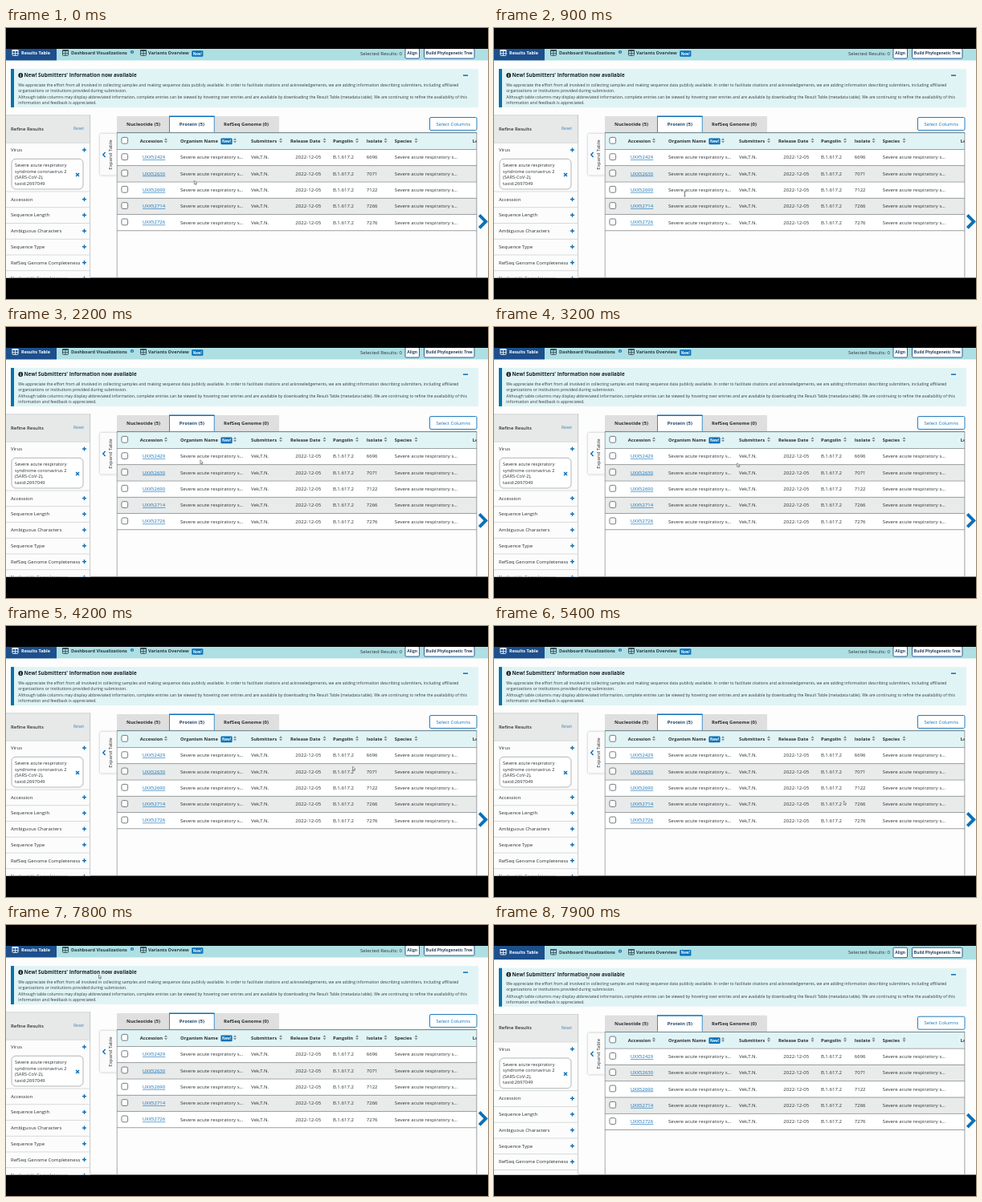
These frames come from a looping animation (600 by 338 pixels, 8000 ms). An HTML page with a canvas:

```html
<!DOCTYPE html>
<html lang="en">
<head>
<meta charset="utf-8">
<title>Results table</title>
<style>
html, body { margin: 0; width: 100%; height: 100%; overflow: hidden; background: #000; }
canvas { display: block; width: 600px; height: 338px; }
</style>
</head>
<body>
<canvas id="stage" width="600" height="338"></canvas>
<script>
const ctx = document.getElementById('stage').getContext('2d');
const LOOP = 8000, STEP = 100;
const BLUE = '#0b6fb8', NAVY = '#1c4f8c', INK = '#2b2f33', LINE = '#cfd2d3', RULE = '#84898c';
const FAMILY = '"Open Sans", "Noto Sans", sans-serif';

function rect(x, y, w, h, color) {
  ctx.fillStyle = color;
  ctx.fillRect(x, y, w, h);
}

function box(x, y, w, h, r, fill, stroke, lw = 1) {
  ctx.beginPath();
  ctx.roundRect(x, y, w, h, r);
  if (fill) { ctx.fillStyle = fill; ctx.fill(); }
  if (stroke) { ctx.strokeStyle = stroke; ctx.lineWidth = lw; ctx.stroke(); }
}

function path(points, color, lw) {
  ctx.beginPath();
  points.forEach(([x, y], i) => i ? ctx.lineTo(x, y) : ctx.moveTo(x, y));
  ctx.strokeStyle = color;
  ctx.lineWidth = lw;
  ctx.stroke();
}

// y is the middle of the capitals; type is set large and scaled down for even spacing
function text(str, x, y, size, color = INK, weight = 400, align = 'left') {
  ctx.save();
  ctx.translate(x, y + size * 0.35);
  ctx.scale(0.1, 0.1);
  ctx.font = `${weight} ${size * 10}px ${FAMILY}`;
  ctx.textAlign = align;
  ctx.fillStyle = color;
  ctx.fillText(str, 0, 0);
  ctx.restore();
}

const bold = (str, x, y, size, color, align) => text(str, x, y, size, color, 700, align);

function gridIcon(x, y, color) {
  box(x + 0.5, y + 0.5, 7, 6.5, 0.8, null, color, 0.9);
  rect(x, y, 8, 1.6, color);
  rect(x + 3.6, y, 0.8, 7, color);
  rect(x, y + 4, 8, 0.8, color);
}

function badge(x, y) {
  box(x, y, 14.2, 7.6, 1.2, '#0872b9');
  bold('New!', x + 7.1, y + 3.8, 4.4, '#fff', 'center');
}

function info(x, y, r, color) {
  ctx.beginPath();
  ctx.arc(x, y, r, 0, Math.PI * 2);
  ctx.fillStyle = color;
  ctx.fill();
  rect(x - r * 0.17, y - r * 0.1, r * 0.4, r * 0.7, '#fff');
  rect(x - r * 0.17, y - r * 0.6, r * 0.4, r * 0.35, '#fff');
}

function plus(x, y) {
  rect(x - 2.5, y - 0.7, 5, 1.4, BLUE);
  rect(x - 0.7, y - 2.5, 1.4, 5, BLUE);
}

function sortMark(x, y) {
  ctx.fillStyle = '#7d878c';
  for (const d of [-1, 1]) {
    ctx.beginPath();
    ctx.moveTo(x - 2, y + d * 0.6);
    ctx.lineTo(x + 2, y + d * 0.6);
    ctx.lineTo(x, y + d * 3);
    ctx.fill();
  }
}

function nav() {
  rect(0, 15, 600, 25.4, '#aedfe2');
  rect(0, 15, 63, 25.4, NAVY);
  gridIcon(7.5, 27.3, '#fff');
  bold('Results Table', 19, 31.5, 5.5, '#fff');
  gridIcon(70, 27.3, '#2d4450');
  bold('Dashboard Visualizations', 81, 31.5, 5.54, '#263840');
  info(157, 30, 2.1, BLUE);
  gridIcon(167, 27.3, '#2d4450');
  bold('Variants Overview', 177, 31.5, 5.54, '#263840');
  badge(231.2, 28.2);
  text('Selected Results: 0', 441, 31.5, 6.02);
  box(497, 25.5, 17.5, 12.5, 1.5, '#fff', NAVY, 0.9);
  bold('Align', 505.7, 31.3, 5.05, '#24405c', 'center');
  box(520.5, 25.5, 62.5, 12.5, 1.5, '#fff', NAVY, 0.9);
  bold('Build Phylogenetic Tree', 551.8, 31.3, 4.97, '#24405c', 'center');
}

function notice() {
  rect(6, 51, 582, 48, '#e1f4f5');
  rect(6, 51, 4, 48, '#0a72a8');
  info(18.2, 59, 2.9, '#1b1e20');
  bold("New! Submitters' Information now available", 22.4, 59, 6.36, '#1e2224');
  rect(569, 58.4, 6, 1.5, BLUE);
  [
    'We appreciate the effort from all involved in collecting samples and making sequence data publicly available. In order to facilitate citations and acknowledgements, we are adding information describing submitters, including affiliated',
    'organizations or institutions provided during submission.',
    'Although table columns may display abbreviated information, complete entries can be viewed by hovering over entries and are available by downloading the Result Table (metadata table). We are continuing to refine the availability of this',
    'information and feedback is appreciated.'
  ].forEach((s, i) => text(s, 15.3, [70.8, 77.9, 86.3, 93.3][i], 5.09, '#33383b'));
}

function sidebar() {
  rect(0, 108.5, 105, 220, '#fbfcfb');
  rect(0, 108.5, 105, 34.5, '#e6e9e8');
  rect(0, 108.5, 105, 0.8, LINE);
  rect(104.2, 108.5, 0.9, 220, '#bfc3c4');
  text('Refine Results', 6, 125.5, 5.98, INK, 600);
  text('Reset', 84, 125.5, 5.05, '#3a7fb4');
  rect(0, 142.8, 105, 0.8, LINE);
  text('Virus', 6, 152, 6);
  plus(97.5, 152);
  box(7, 163.3, 89, 37.7, 5, '#fff', '#a9aeb0', 0.9);
  ['Severe acute respiratory', 'syndrome coronavirus 2', '(SARS-CoV-2),', 'taxid:2697049']
    .forEach((s, i) => text(s, 11, 171.2 + i * 7.45, 5.72));
  path([[87, 181], [91, 185]], BLUE, 1.4);
  path([[91, 181], [87, 185]], BLUE, 1.4);
  ['Accession', 'Sequence Length', 'Ambiguous Characters', 'Sequence Type',
    'RefSeq Genome Completeness', 'Nucleotide Completeness'].forEach((s, i) => {
    const y = 213.6 + i * 19.75;
    rect(0, y - 10, 105, 0.8, LINE);
    text(s, 6, y, 6);
    plus(97.5, y);
  });
}

function expander() {
  ctx.save();
  ctx.shadowColor = 'rgba(0,0,0,.3)';
  ctx.shadowBlur = 3;
  box(117, 132, 21, 51.5, 1.5, '#fbfbfb');
  ctx.restore();
  path([[123.6, 155], [120.8, 158], [123.6, 161]], BLUE, 1.4);
  ctx.save();
  ctx.translate(129.8, 158);
  ctx.rotate(-Math.PI / 2);
  text('Expand Table', 0, 0, 6.05, INK, 400, 'center');
  ctx.restore();
}

function tabs() {
  rect(138, 110, 65, 20.5, '#dedfde');
  rect(259.5, 110, 80.5, 20.5, '#dedfde');
  rect(203, 109.5, 56.5, 21, '#fff');
  rect(203, 109.5, 56.5, 1.5, BLUE);
  rect(203, 110, 0.8, 20, BLUE);
  rect(258.8, 110, 0.8, 20, BLUE);
  bold('Nucleotide (5)', 150, 120.1, 6.02);
  bold('Protein (5)', 215.8, 120.1, 6.02, '#1d4569');
  bold('RefSeq Genome (0)', 271, 120.1, 6);
  box(527.5, 111.5, 58.5, 16, 1.5, '#fff', BLUE, 0.9);
  text('Select Columns', 556.8, 119.5, 5.95, BLUE, 400, 'center');
}

const checkbox = y => box(143.9, y - 3.9, 7.7, 7.8, 1.8, '#fff', '#666d71', 0.9);

function table() {
  ctx.save();
  ctx.beginPath();
  ctx.rect(137.5, 130, 448.5, 190);
  ctx.clip();
  rect(138, 130, 448, 21, '#e1f4f5');
  rect(138, 130.2, 448, 0.9, '#5a6f7a');
  checkbox(140.3);
  [['Accession', 166.8, 199], ['Organism Name', 217, 285], ['Submitters', 305, 342],
    ['Release Date', 354, 396.5], ['Pangolin', 407, 437], ['Isolate', 448.8, 472.5],
    ['Species', 483.8, 510.5], ['Length', 580.7, 610]].forEach(([s, x, mark]) => {
    bold(s, x, 141, 5.78);
    sortMark(mark, 140.3);
  });
  badge(267.4, 137.6);

  const species = 'Severe acute respiratory s…';
  [['UXX52429', '6696'], ['UXX52630', '7071'], ['UXX52690', '7122'],
    ['UXX52714', '7266'], ['UXX52726', '7276']].forEach(([id, isolate], i) => {
    const top = 151 + i * 20.3, y = top + 10.2;
    rect(138, top, 448, 20.3, i % 2 ? '#e9ebea' : '#fff');
    rect(138, top, 448, 0.8, RULE);
    checkbox(y - 0.5);
    text(id, 184, y, 5.95, BLUE, 400, 'center');
    rect(170, y + 3.1, 28.3, 0.6, BLUE);
    text(species, 217, y, 6.12);
    text('Vek,T.N.', 305, y, 6.12);
    text('2022-12-05', 360.3, y, 6.1);
    text('B.1.617.2', 407, y, 6.1);
    text(isolate, 448.8, y, 6);
    text(species, 483.8, y, 6.12);
  });
  rect(138, 252.4, 448, 0.8, RULE);
  rect(137.6, 130, 0.9, 190, RULE);
  ctx.restore();
  rect(585.5, 130, 0.8, 190, RULE);
}

function arrow(x, y) {
  ctx.save();
  ctx.translate(x, y);
  ctx.scale(0.9, 0.9);
  ctx.beginPath();
  [[0, 0], [0, 5.2], [1.2, 4.1], [2.1, 6], [3, 5.6], [2.2, 3.8], [3.9, 3.7]]
    .forEach(p => ctx.lineTo(...p));
  ctx.closePath();
  ctx.fillStyle = '#fff';
  ctx.fill();
  ctx.strokeStyle = '#444';
  ctx.lineWidth = 0.6;
  ctx.stroke();
  ctx.restore();
}

function beam(x, y) {
  path([[x, y - 2.8], [x, y + 2.8]], '#444', 0.7);
  for (const d of [-2.8, 2.8]) path([[x - 1.2, y + d], [x + 1.2, y + d]], '#444', 0.6);
}

// time, x, y of the pointer
const route = [
  [0, 234.3, 190.3], [900, 237.5, 207], [1300, 238, 207], [2200, 241.8, 166], [2600, 243, 167],
  [4200, 431.5, 175.3], [5400, 435.3, 218.3], [6900, 406.6, 196.4], [7200, 404, 193],
  [7800, 115.5, 62], [8000, 115.5, 62]
];

const ease = (a, b, t) => {
  const u = Math.min(1, Math.max(0, (t - a) / (b - a)));
  return u * u * (3 - 2 * u);
};

function pointer(t) {
  const i = route.findIndex((p, k) => k && t <= p[0]);
  const [t0, x0, y0] = route[i - 1], [t1, x1, y1] = route[i];
  const u = ease(t0, t1, t);
  const x = x0 + (x1 - x0) * u, y = y0 + (y1 - y0) * u;
  if (t > 500 && t < 1500) beam(x, y);
  else arrow(x, y);
}

function draw(t) {
  rect(0, 0, 600, 338, '#000');
  ctx.save();
  ctx.beginPath();
  ctx.rect(0, 26, 600, 285.6);
  ctx.clip();
  rect(0, 26, 600, 286, '#fcfdfc');
  ctx.save();
  ctx.translate(0, 2.7 * ease(7800, 7900, t));
  nav();
  notice();
  sidebar();
  expander();
  tabs();
  table();
  path([[589.3, 233.4], [597.2, 241.4], [589.3, 249.4]], BLUE, 3.8);
  ctx.restore();
  pointer(t);
  ctx.restore();
}

function tick() {
  const now = performance.now() % LOOP;
  draw(Math.floor(now / STEP) * STEP);
  requestAnimationFrame(tick);
}
tick();
</script>
</body>
</html>
```
